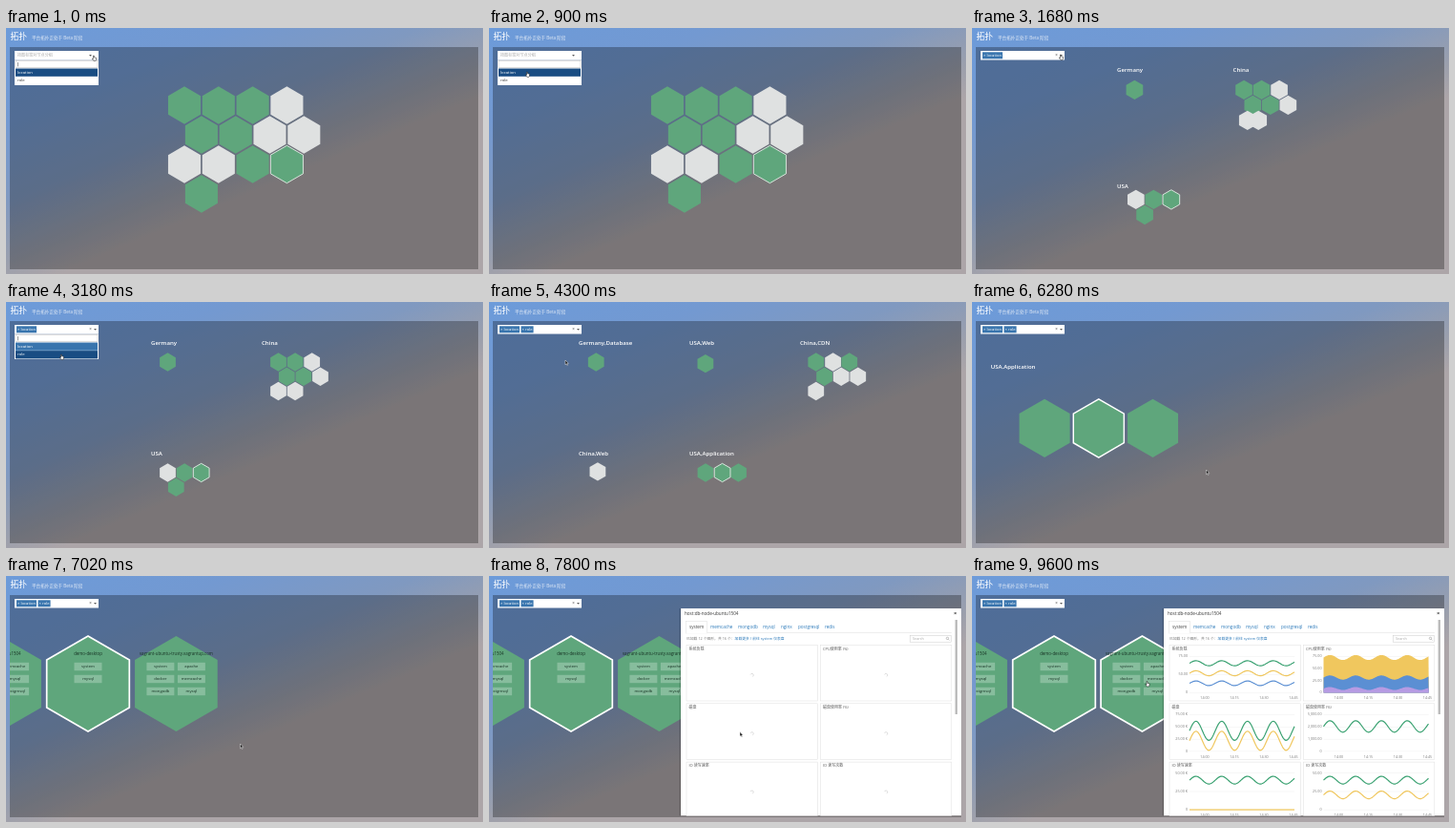
Animation of 500x258 px, one loop 9620 ms. Source, as an HTML page with a canvas:

```html
<!DOCTYPE html>
<html lang="zh">
<head>
<meta charset="utf-8">
<title>拓扑</title>
<style>
html, body { margin: 0; width: 100%; height: 100%; overflow: hidden; background: #8f9db8; }
canvas { display: block; width: 500px; height: 258px; }
</style>
</head>
<body>
<canvas id="stage"></canvas>
<script>
const W = 500, H = 258, LOOP = 9620;
const canvas = document.getElementById('stage');
const ratio = window.devicePixelRatio || 1;
canvas.width = W * ratio;
canvas.height = H * ratio;
const c = canvas.getContext('2d');
c.scale(ratio, ratio);

const FONT = '"Open Sans", "Noto Sans CJK SC", "Noto Sans CJK", sans-serif';
const GREEN = '#5fa67c', WHITE = '#dfe1e1', BLUE = '#3975ae', NAVY = '#194d83';
const LINK = '#2b79b9', YELLOW = '#f0c75e', LINE_GREEN = '#3ba272', LINE_BLUE = '#5b8fd3';

const lerp = (a, b, p) => a + (b - a) * p;
const progress = (t, start, end) => Math.min(1, Math.max(0, (t - start) / (end - start)));
const ease = p => p < .5 ? 4 * p ** 3 : 1 - 4 * (1 - p) ** 3;

function rect(x, y, w, h, fill, stroke) {
  if (fill) { c.fillStyle = fill; c.fillRect(x, y, w, h); }
  if (stroke) { c.strokeStyle = stroke; c.lineWidth = .5; c.strokeRect(x, y, w, h); }
}

function text(str, x, y, size, color, align = 'left', weight = 400) {
  c.font = `${weight} ${size}px ${FONT}`;
  c.fillStyle = color;
  c.textAlign = align;
  c.textBaseline = 'middle';
  c.fillText(str, x, y);
  return c.measureText(str).width;
}

function path(points, close) {
  c.beginPath();
  points.forEach(([x, y]) => c.lineTo(x, y));
  if (close) c.closePath();
}

// Layouts: groups of hexagon ids in rows, odd rows shifted by half a step
const SELECTED = 11;
const makeGroup = (label, x, y, rows, dx = 17.5, dy = 20) => ({ label, x, y, rows, dx, dy });

function arrange(groups, step) {
  const spots = [];
  for (const g of groups) g.rows.forEach((row, r) => row.forEach((id, i) => {
    spots[id] = { x: g.x + g.dx + (i + r % 2 / 2) * step, y: g.y + g.dy + r * step * .866 };
  }));
  return { groups, step, spots };
}

const germany = [[2]], china = [[0, 1, 3], [4, 5, 7], [8, 9]], usa = [[6, 10, 11], [12]];
const flat = arrange([makeGroup('', 187, 81, [[0, 1, 2, 3], [4, 5, 6, 7], [8, 9, 10, 11], [12]], 0, 0)], 35.8);
const settling = arrange([
  makeGroup('Germany', 152, 44, germany, 18.5, 21),
  makeGroup('China', 274, 44, china, 11, 21),
  makeGroup('USA', 152, 167, usa, 20, 13)], 18.6);
settling.spots[8].x = 289;
settling.spots[9].x = 300;
const byLocation = arrange([
  makeGroup('Germany', 152, 43, germany),
  makeGroup('China', 268, 43, china),
  makeGroup('USA', 152, 159, usa)], 17.6);
const byRole = arrange([
  makeGroup('Germany,Database', 94, 43, [[2]]),
  makeGroup('USA,Web', 210, 43, [[12]]),
  makeGroup('China,CDN', 326, 43, [[0, 3, 1], [4, 5, 7], [8]]),
  makeGroup('China,Web', 94, 159, [[9]]),
  makeGroup('USA,Application', 210, 159, [[10, 11, 6]])], 17.6);

const mixPoint = (a, b, p) => ({ x: lerp(a.x, b.x, p), y: lerp(a.y, b.y, p) });
const mix = (a, b, p) => ({
  step: lerp(a.step, b.step, p),
  spots: a.spots.map((s, i) => mixPoint(s, b.spots[i], p)),
  labels: []
});

function layoutAt(t) {
  if (t < 3550) {
    const p = ease(progress(t, 1000, 1880)), knee = .95;
    const pose = p < knee ? mix(flat, settling, p / knee)
                          : mix(settling, byLocation, (p - knee) / (1 - knee));
    if (p > 0) pose.labels = byLocation.groups.map((g, i) => ({
      label: g.label, ...mixPoint(g, settling.groups[i], (1 - p) / (1 - knee))
    }));
    return pose;
  }
  const pose = mix(byLocation, byRole, ease(progress(t, 3550, 4430)));
  pose.labels = byRole.groups;
  return pose;
}

function hexPath(x, y, r) {
  path(Array.from({ length: 6 }, (_, i) => {
    const a = (i + .5) * Math.PI / 3;
    return [x + r * Math.cos(a), y + r * Math.sin(a)];
  }), true);
}

const hosts = {
  10: ['db-node-ubuntu1504', ['system', 'memcache', 'nginx', 'mysql', 'mongodb', 'postgresql']],
  11: ['demo-desktop', ['system', 'mysql']],
  6: ['vagrant-ubuntu-trusty.vagrantup.com', ['system', 'apache', 'docker', 'memcache', 'mongodb', 'mysql']]
};

function drawHost([name, services], x, y) {
  text(name, x, y - 31, 4.4, '#173324', 'center');
  const columns = services.length > 2 ? 2 : 1;
  services.forEach((service, i) => {
    const cx = x + (columns === 2 ? (i % 2 ? 16 : -16.5) : 0);
    const cy = y - 18 + Math.floor(i / columns) * 13;
    rect(cx - 14.5, cy - 4.2, 29, 8.4, 'rgba(255,255,255,.25)');
    text(service, cx, cy, 4.2, '#173324', 'center');
  });
}

function drawTopology(t, cursor) {
  const pose = layoutAt(t);
  const p = ease(progress(t, 5700, 6700));
  const zoom = 5.25 ** p;
  const focus = { x: 245.1, y: 179 };
  const center = mixPoint(focus, { x: 86, y: 113 }, p);
  const project = s => ({ x: center.x + (s.x - focus.x) * zoom, y: center.y + (s.y - focus.y) * zoom });
  const radius = pose.step * zoom * .55 - p * .8;
  const pale = t < 3950 ? [3, 6, 7, 8, 9] : [3, 5, 7, 8, 9];

  c.save();
  c.beginPath();
  c.rect(4, 20, 491, 233);
  c.clip();
  pose.spots.forEach((spot, id) => {
    const { x, y } = project(spot);
    hexPath(x, y, radius);
    c.fillStyle = pale.includes(id) ? WHITE : GREEN;
    c.fill();
    const hovered = t > 8500 && id === 6 && Math.hypot(cursor.x - x, cursor.y - y) < radius * .87;
    if (id === SELECTED || hovered) {
      c.strokeStyle = p > .5 ? '#fff' : '#e4efe7';
      c.lineWidth = lerp(.9, 1.7, p);
      c.stroke();
    }
    if (zoom > 4 && hosts[id]) {
      c.globalAlpha = progress(zoom, 4, 5);
      drawHost(hosts[id], x, y);
      c.globalAlpha = 1;
    }
  });
  for (const g of pose.labels) {
    const { x, y } = project(g);
    text(g.label, x, y, 6.1, '#fff', 'left', 600);
  }
  c.restore();
}

function drawBackground() {
  const g = c.createLinearGradient(0, 0, 101, 240);
  g.addColorStop(0, '#6c9bda');
  g.addColorStop(.35, '#7399d1');
  g.addColorStop(.65, '#8099c0');
  g.addColorStop(.88, '#9b9fac');
  g.addColorStop(1, '#aca5a8');
  rect(0, 0, W, H, g);
  rect(4, 20, 491, 233, 'rgba(0,0,0,.29)');
  text('拓扑', 4.5, 9.5, 8.8, '#fff', 'left', 500);
  text('平台拓扑正处于 Beta 阶段', 27, 11, 4.6, '#e3ebf6');
}

function drawSelect(t, cursor) {
  const open = t < 950 || (t > 2300 && t < 3500);
  const tags = t < 950 ? [] : t < 3500 ? ['location'] : ['location', 'role'];
  rect(9, 24, 88, 9.5, '#fff');
  if (!tags.length) text('按图标签对节点分组', 12, 29, 4.1, '#aaa');
  let x = 11;
  for (const tag of tags) {
    c.font = `400 4.2px ${FONT}`;
    const w = c.measureText('× ' + tag).width + 2;
    rect(x, 25.3, w, 7, BLUE);
    text('× ' + tag, x + 1, 28.8, 4.2, '#fff');
    x += w + 1.5;
  }
  if (tags.length) text('×', 88.5, 28.8, 4.5, '#555', 'center');
  const arrow = tags.length ? 93.5 : 88.5;
  path([[arrow - 1.4, 28], [arrow + 1.4, 28], [arrow, 29.8]], true);
  c.fillStyle = '#555';
  c.fill();
  if (!open) return;
  rect(9, 33.5, 88, 26.5, '#fff');
  rect(10, 34.7, 86, 7, '#fff', '#bbb');
  if (t % 1000 < 500) rect(12.5, 36, .5, 4.4, '#333');
  ['location', 'role'].forEach((option, i) => {
    const hovered = i === (cursor.y > 51 ? 1 : 0);
    const fill = hovered ? NAVY : tags.includes(option) ? BLUE : '#fff';
    rect(10, 42.5 + i * 8.6, 86, 8.3, fill);
    text(option, 12, 46.7 + i * 8.6, 4.3, fill === '#fff' ? '#333' : '#fff');
  });
}

// Each series: color, mean offset above the baseline, amplitude, filled area
const charts = [
  { title: '系统负载', ticks: ['75.00', '50.00', '0'], series: [[LINE_GREEN, 31, 2.6], [YELLOW, 20.5, 2.6], [LINE_BLUE, 10, 2.4]] },
  { title: 'CPU使用率 (%)', ticks: ['75.00', '50.00', '25.00', '0'], series: [[YELLOW, 37, 2.6, 1], [LINE_BLUE, 16, 2.2, 1], ['#b69be3', 4.5, 1.5, 1]] },
  { title: '磁盘', ticks: ['75.00 K', '50.00 K', '25.00 K', '0'], series: [[LINE_GREEN, 21.5, 10], [YELLOW, 11, 10]] },
  { title: '磁盘使用率 (%)', ticks: ['5,000.00', '2,000.00', '1,000.00', '0'], series: [[LINE_GREEN, 26, 6]] },
  { title: 'IO 读写速率', ticks: ['50.00 K', '25.00 K', '0'], series: [[LINE_GREEN, 31, 4], [YELLOW, 0, 0]] },
  { title: 'IO 读写次数', ticks: ['50.00', '25.00', '0'], series: [[LINE_GREEN, 31, 4], [YELLOW, 15.5, 4]] }
];

function drawChart(chart, x, y, w) {
  const base = y + 50, left = x + 21, right = x + w - 6;
  chart.ticks.forEach((tick, i) => {
    const ty = base - 38.5 * (1 - i / (chart.ticks.length - 1));
    rect(left, ty, right - left, .3, '#e4e4e4');
    text(tick, left - 2, ty, 3.7, '#777', 'right');
  });
  ['14:00', '14:15', '14:30', '14:45'].forEach((label, i) =>
    text(label, left + 16 + i * 31, y + 56, 3.7, '#777', 'center'));
  for (const [color, mean, amp, area] of chart.series) {
    const points = [];
    for (let px = left; px <= right; px++)
      points.push([px, base - mean - amp * Math.sin((px - left) / 27 * 2 * Math.PI)]);
    if (area) {
      path([...points, [right, base], [left, base]], true);
      c.fillStyle = color;
      c.fill();
    } else {
      path(points);
      c.strokeStyle = color;
      c.lineWidth = 1.2;
      c.stroke();
    }
  }
}

function drawDrawer(t) {
  const p = 1 - (1 - progress(t, 7250, 7600)) ** 3;
  if (p === 0) return;
  c.save();
  c.beginPath();
  c.rect(0, 34, 495, 217.5);
  c.clip();
  c.translate((1 - p) * 295, 0);
  rect(199.8, 34, 1.2, 218, 'rgba(0,0,0,.2)');
  rect(201, 34, 294, 217.5, '#fff');
  text('host:db-node-ubuntu1504', 205, 40, 4.6, '#333');
  text('×', 488.7, 39.5, 6, '#222', 'center', 600);
  rect(207, 59.3, 278, .5, '#ddd');
  rect(206.5, 47.5, 22, 12.5, '#fff', '#ddd');
  rect(206.8, 59, 21.4, 1.3, '#fff');
  const tabs = { system: 210, memcache: 232, mongodb: 261, mysql: 287, nginx: 306, postgresql: 324, redis: 352 };
  for (const tab in tabs) text(tab, tabs[tab], 53.3, 4.6, tab === 'system' ? '#444' : LINK);
  const note = '已加载 12 个图形，共 16 个：';
  const noteWidth = text(note, 207, 65.8, 3.8, '#777');
  text('加载更多 / 前往 system 仪表盘', 207 + noteWidth, 65.8, 3.8, LINK);
  rect(441.5, 62.5, 43, 6.7, '#fff', '#ccc');
  text('Search', 444, 65.9, 3.8, '#aaa');
  c.strokeStyle = '#888';
  c.lineWidth = .5;
  c.beginPath();
  c.arc(480.5, 65.4, 1.2, 0, 7);
  c.moveTo(481.4, 66.3);
  c.lineTo(482.6, 67.5);
  c.stroke();

  charts.forEach((chart, i) => {
    const x = i % 2 ? 347.5 : 207, y = 72.5 + Math.floor(i / 2) * 61.3, w = 137.3;
    rect(x, y, w, 58.5, '#fff', '#ddd');
    text(chart.title, x + 2.5, y + 4.2, 4, '#555');
    if (t > 8250) return drawChart(chart, x, y, w);
    const a = t / 130;
    c.beginPath();
    c.arc(x + w / 2, y + 31.5, 1.6, a, a + 4);
    c.strokeStyle = '#bbb';
    c.lineWidth = .5;
    c.stroke();
  });
  rect(488.6, 46, 2.4, 99, '#bcbcbc');
  c.restore();
}

const cursorStops = [
  [0, 92, 30], [300, 92, 30], [800, 40, 47], [980, 40, 47], [1500, 93, 29], [2400, 93, 29],
  [2900, 58, 56], [3600, 58, 56], [4300, 80, 62], [5200, 245.5, 177], [7100, 245.5, 177],
  [7600, 263, 164.5], [8500, 263, 164.5], [9300, 183.5, 111.5], [LOOP, 183.5, 111.5]
];

function cursorAt(t) {
  const i = cursorStops.findIndex(s => s[0] > t);
  const [t0, x0, y0] = cursorStops[i - 1], [t1, x1, y1] = cursorStops[i];
  const p = progress(t, t0, t1), s = p * p * (3 - 2 * p);
  return { x: lerp(x0, x1, s), y: lerp(y0, y1, s) };
}

function drawCursor(t, { x, y }) {
  const hand = t < 3600 || (t > 5000 && t < 6000) || (t > 8500 && x < 201);
  const shape = hand
    ? [[-.5, -1], [.3, -1], [.5, .8], [2.6, 1.3], [2.4, 3.6], [1.9, 4.4], [-.2, 4.4], [-1.7, 2], [-.4, 2.2]]
    : [[0, -1], [0, 3.8], [1.1, 2.8], [1.9, 4.5], [2.6, 4.1], [1.8, 2.5], [3.2, 2.4]];
  path(shape.map(([dx, dy]) => [x + dx, y + dy]), true);
  c.fillStyle = hand ? '#fff' : '#111';
  c.strokeStyle = hand ? '#111' : '#eee';
  c.lineWidth = .5;
  c.fill();
  c.stroke();
}

function frame(now) {
  const t = now % LOOP;
  const cursor = cursorAt(t);
  drawBackground();
  drawTopology(t, cursor);
  drawSelect(t, cursor);
  drawDrawer(t);
  drawCursor(t, cursor);
}

const begin = performance.now();
function tick() {
  frame(performance.now() - begin);
  requestAnimationFrame(tick);
}
tick();
</script>
</body>
</html>
```
